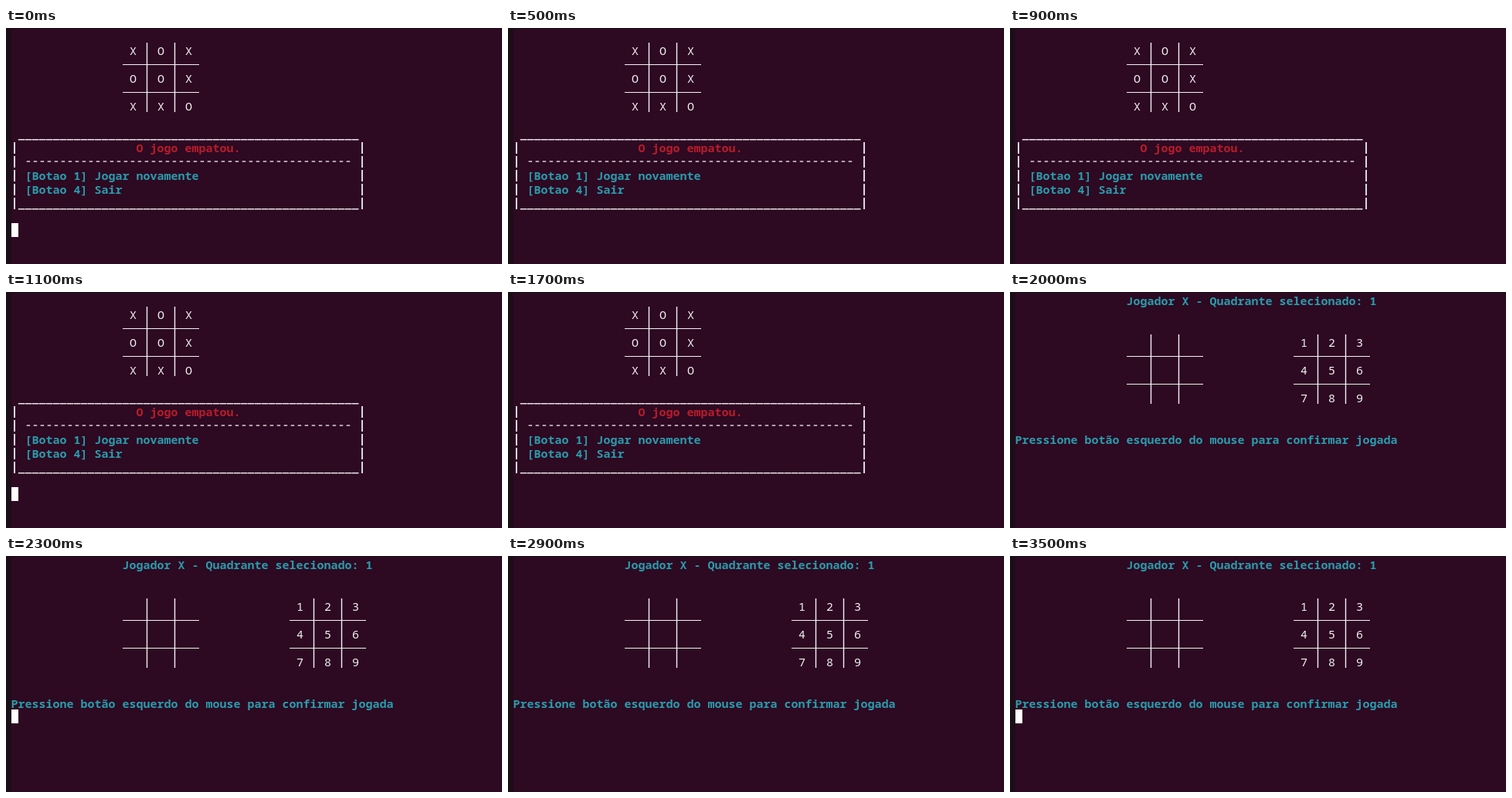
Write an HTML page that moves like this. It is 642 by 306 pixels and loops after 4200 ms.

```html
<!DOCTYPE html>
<html lang="pt">
<head>
<meta charset="utf-8">
<title>Jogo da velha</title>
<style>
html, body { margin: 0; width: 100%; height: 100%; overflow: hidden; background: #2d0922; }
svg { display: block; }
text { font: 500 15px "Noto Sans Mono", "DejaVu Sans Mono", monospace; fill: #f4f2f3; }
.bold { font-weight: 700; transform: translateX(-0.5px); }
.teal { fill: #2a9cac; }
.red { fill: #b81c2a; }
</style>
</head>
<body>
<svg id="stage" width="642" height="306" viewBox="0 0 642 306">
  <rect width="642" height="306" fill="#2d0922"/>
  <rect width="642" height="1" fill="#1a0f17"/>
  <rect width="6.5" height="306" fill="#1a0f17"/>
  <g id="result"></g>
  <g id="turn"></g>
  <rect id="cursor" x="7" width="9" height="18" fill="#fff"/>
</svg>
<script>
const LOOP = 4200, SWITCH = 1800;
const BLINKS = [[0, 500], [1100, 1700], [2300, 2900], [3500, LOOP]];
const NS = "http://www.w3.org/2000/svg";
const $ = id => document.getElementById(id);
const result = $("result"), turn = $("turn"), cursor = $("cursor");

// Terminal cells are 9 x 18 pixels
const cellX = col => 7 + col * 9;
const cellY = row => 1 + row * 18;

function add(parent, tag, attrs, content = "") {
  const el = document.createElementNS(NS, tag);
  for (const key in attrs) el.setAttribute(key, attrs[key]);
  el.textContent = content;
  parent.append(el);
}

function print(parent, col, row, content, style = "") {
  add(parent, "text", { x: cellX(col), y: cellY(row) + 16, class: style }, content);
}

function bar(parent, x, y, width, height, fill = "#f4f2f3") {
  add(parent, "rect", { x, y, width, height, fill });
}

function board(parent, col, row, marks) {
  const x = cellX(col), y = cellY(row);
  for (const i of [0, 1]) {
    bar(parent, x + 30.8 + i * 36, y, 1.4, 90);
    bar(parent, x, y + 28 + i * 36, 99, 1);
  }
  [...marks].forEach((mark, i) => {
    if (mark !== " ") print(parent, col + 1 + i % 3 * 4, row + Math.floor(i / 3) * 2, mark);
  });
}

function buildFrame() {
  for (let col = 1; col < 50; col++) {
    for (const row of [7, 12]) bar(result, cellX(col) - 0.2, cellY(row) + 17, 8.7, 1.5, "#e8e4e6");
  }
  for (let row = 8; row < 13; row++) {
    for (const col of [0, 50]) bar(result, cellX(col) + 3, cellY(row) + 3, 2, 15, "#dcd5ea");
  }
  for (let col = 2; col < 49; col++) bar(result, cellX(col) + 1.7, cellY(9) + 9.3, 4.5, 1.5, "#d8d2d6");
}

function buildResult() {
  board(result, 16, 1, "XOXOOXXXO");
  buildFrame();
  print(result, 18, 8, "O jogo empatou.", "bold red");
  print(result, 2, 10, "[Botao 1] Jogar novamente", "bold teal");
  print(result, 2, 11, "[Botao 4] Sair", "bold teal");
}

function buildTurn() {
  print(turn, 16, 0, "Jogador X - Quadrante selecionado: 1", "bold teal");
  board(turn, 16, 3, "         ");
  board(turn, 40, 3, "123456789");
  print(turn, 0, 10, "Pressione botão esquerdo do mouse para confirmar jogada", "bold teal");
}

const show = (el, on) => el.setAttribute("visibility", on ? "visible" : "hidden");

function draw(time) {
  const t = time % LOOP, playing = t >= SWITCH;
  show(result, !playing);
  show(turn, playing);
  show(cursor, BLINKS.some(([from, to]) => t >= from && t < to));
  cursor.setAttribute("y", cellY(playing ? 11 : 14));
}

buildResult();
buildTurn();
draw(0);

let start;
function tick(now) {
  start ??= now;
  draw(now - start);
  requestAnimationFrame(tick);
}
requestAnimationFrame(tick);
</script>
</body>
</html>
```
